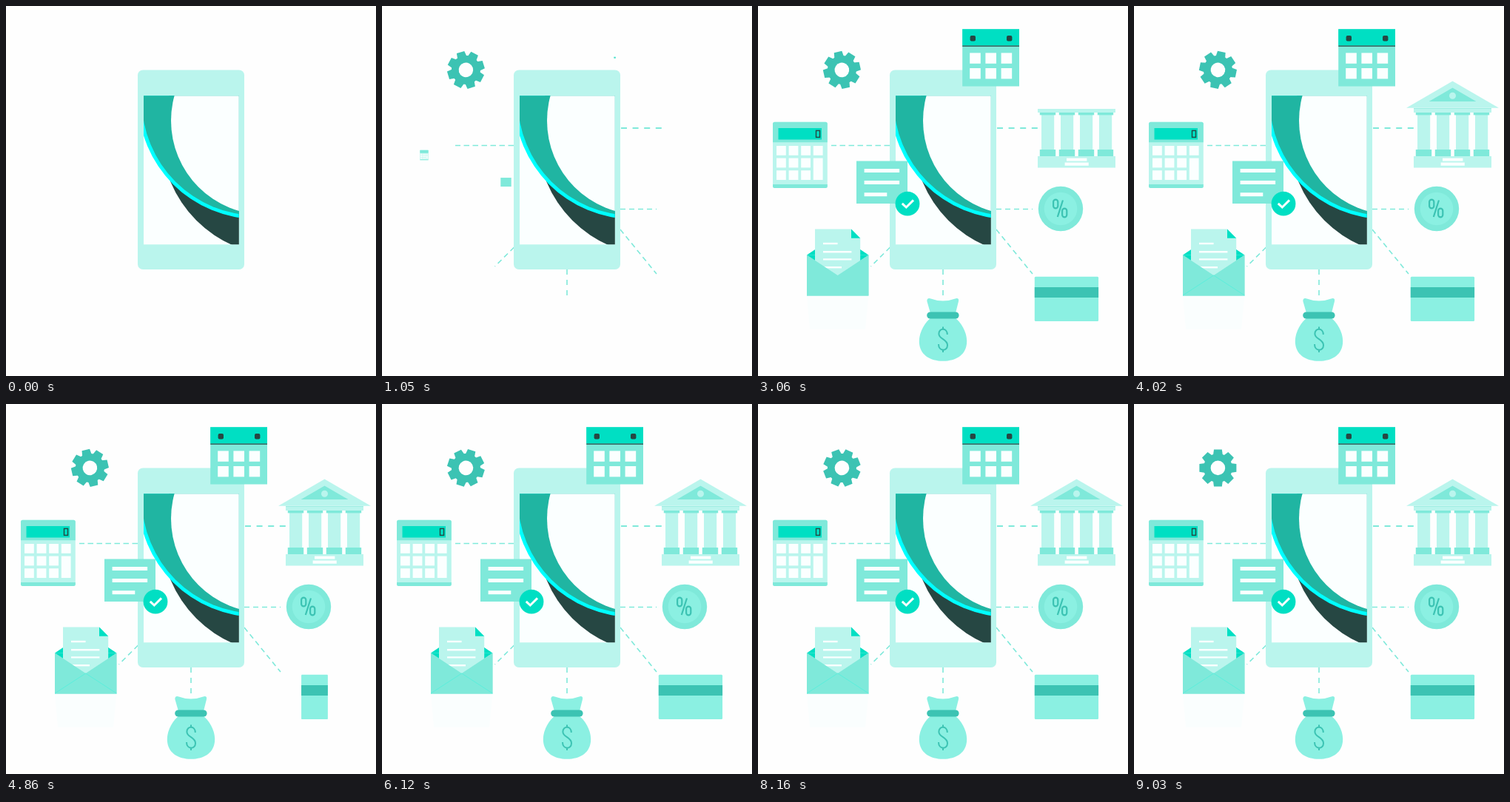
These frames come from a looping animation (500x500 px, 9.06 s). An HTML page with a canvas:

```html
<!DOCTYPE html>
<html lang="en">
<head>
<meta charset="utf-8">
<title>Mobile banking</title>
<style>
html, body { margin: 0; width: 100%; height: 100%; overflow: hidden; background: #fefefe; }
canvas { display: block; width: 500px; height: 500px; }
</style>
</head>
<body>
<canvas id="stage"></canvas>
<script>
const LOOP = 9060;
const PALE = '#baf5ed', MID = '#7fe9da', MINT = '#8bf0e2', ACCENT = '#00dfc3';
const TEAL = '#3cc3b3', DARK = '#264743', WHITE = '#fbffff', PAGE = '#fefefe';

const canvas = document.getElementById('stage');
const ctx = canvas.getContext('2d');
const dpr = window.devicePixelRatio || 1;
canvas.width = canvas.height = 500 * dpr;

let now = 0;

const linear = (from, dur) => Math.min(1, Math.max(0, (now - from) / dur));
const ease = (from, dur) => (1 - Math.cos(Math.PI * linear(from, dur))) / 2;
const mix = (a, b, p) => a + (b - a) * p;

function box(x, y, w, h, color, r = 0) {
  ctx.fillStyle = color;
  ctx.beginPath();
  if (r) ctx.roundRect(x, y, w, h, r); else ctx.rect(x, y, w, h);
  ctx.fill();
}

function disc(x, y, r, color) {
  ctx.fillStyle = color;
  ctx.beginPath();
  ctx.arc(x, y, r, 0, Math.PI * 2);
  ctx.fill();
}

function poly(color, ...pts) {
  ctx.fillStyle = color;
  ctx.beginPath();
  for (let i = 0; i < pts.length; i += 2) ctx.lineTo(pts[i], pts[i + 1]);
  ctx.closePath();
  ctx.fill();
}

function stroke(color, width, ...pts) {
  ctx.strokeStyle = color;
  ctx.lineWidth = width;
  ctx.beginPath();
  for (let i = 0; i < pts.length; i += 2) ctx.lineTo(pts[i], pts[i + 1]);
  ctx.stroke();
}

// Draws around (x, y) with its own scale; nothing at zero scale.
function scaled(x, y, sx, sy, draw) {
  if (sx < 0.002 || sy < 0.002) return;
  ctx.save();
  ctx.translate(x, y);
  ctx.scale(sx, sy);
  ctx.translate(-x, -y);
  draw();
  ctx.restore();
}

function dashes(x1, y1, x2, y2, dash, gap, width = 1.6) {
  const p = ease(90, 840);
  if (!p) return;
  ctx.setLineDash([dash, gap]);
  stroke(MID, width, x1, y1, mix(x1, x2, p), mix(y1, y2, p));
  ctx.setLineDash([]);
}

function connectors() {
  dashes(178, 188.5, 99, 188.5, 7.5, 4.5);
  dashes(323, 165, 378, 165, 8, 7.6, 1.8);
  dashes(322, 274.5, 371, 274.5, 7, 5);
  dashes(322, 302, 371, 362, 7, 5);
  dashes(178.5, 326, 152.5, 352, 7, 5);
  dashes(250, 356, 250, 392, 7, 7);
}

function phone() {
  box(178, 86.5, 144, 269.5, PALE, 7);
  ctx.save();
  ctx.beginPath();
  ctx.rect(186, 121.3, 128.8, 201);
  ctx.clip();
  box(186, 121, 129, 202, WHITE);
  disc(370.4, 176.7, 160, DARK);
  disc(339, 127.6, 160.2, '#00ffff');
  disc(339, 127.6, 155.4, '#20b5a2');
  disc(350, 155, 127, WHITE);
  ctx.restore();
}

function gear() {
  const s = ease(300, 600);
  if (!s) return;
  ctx.save();
  ctx.translate(113.4, 86.4);
  ctx.scale(s, s);
  ctx.rotate(Math.PI * (now - 1740) / 7290);
  disc(0, 0, 19.5, TEAL);
  for (let i = 0; i < 8; i++) {
    poly(TEAL, -6.5, -17, -5.4, -25, 5.4, -25, 6.5, -17);
    ctx.rotate(Math.PI / 4);
  }
  disc(0, 0, 9.8, PAGE);
  ctx.restore();
}

function calculator() {
  const s = ease(910, 550);
  scaled(57, 201.5, s, s, () => {
    box(20, 156.8, 73.8, 89, PALE, 2.5);
    box(20, 156.8, 73.8, 27.4, MID, [2.5, 2.5, 0, 0]);
    box(20, 241, 73.8, 5, MID, [0, 0, 2.5, 2.5]);
    for (let row = 0; row < 3; row++)
      for (let col = 0; col < 4; col++) {
        if (col === 3 && row === 2) continue;
        const tall = col === 3 && row === 1;
        box(25 + col * 16.6, 189 + row * 16.6, 12.8, tall ? 29.4 : 12.8, WHITE);
      }
    box(27.5, 165, 58.5 * ease(1450, 500), 15.4, ACCENT);
    if (now > 1960) {
      ctx.strokeStyle = DARK;
      ctx.lineWidth = 1.4;
      ctx.strokeRect(78.5, 168.4, 5, 9);
    }
  });
}

function calendar() {
  const s = ease(990, 550);
  scaled(314.6, 70, s, s, () => {
    box(276.2, 31.2, 76.8, 77.2, MID);
    box(276.2, 31.2, 76.8, 22.4, ACCENT);
    box(276.2, 53.5, 76.8, 1.2, DARK);
    box(286.6, 40, 7.4, 7.4, DARK, 2);
    box(336, 40, 7.4, 7.4, DARK, 2);
    for (let i = 0; i < 6; i++) {
      ctx.globalAlpha = linear(1600 + i * 110, 160);
      box(286.2 + (i % 3) * 21.2, 63.4 + (i > 2 ? 20.6 : 0), 14.6, 14.4, WHITE);
    }
    ctx.globalAlpha = 1;
  });
}

function note() {
  const s = ease(900, 500);
  scaled(167.5, 238, s, s, () => {
    box(133, 209.5, 69, 57.5, MID);
    [47.5, 47.5, 30.7].forEach((w, i) =>
      box(143.6, 220 + i * 16.1, w * ease(1200 + i * 200, 280), 5, WHITE));
  });
  const b = ease(1900, 350);
  scaled(202, 267.2, b, b, () => {
    disc(202, 267.2, 16.4, ACCENT);
    stroke(WHITE, 3, 194.8, 266.8, 200.3, 272, 210, 262.4);
  });
}

function bank() {
  scaled(430.5, 211, ease(1910, 350), 1, () => {
    box(378, 203, 105, 15.6, PALE);
    box(417, 205.6, 27.4, 4, WHITE);
    box(414.6, 211.6, 32.2, 4.2, WHITE);
  });
  for (let i = 0; i < 4; i++) {
    const x = 380.8 + i * 26;
    scaled(x, 203, 1, ease(2180 + i * 70, 380), () => {
      box(x + 2.2, 144, 17.2, 59, PALE);
      box(x, 144, 21.4, 3.4, MID);
      box(x, 194, 21.4, 9, MID);
    });
  }
  scaled(430.5, 141.5, ease(2560, 300), 1, () => box(378, 139, 105, 5, PALE));
  scaled(430.5, 138.3, 1, ease(3080, 420), () => {
    poly(PALE, 368, 137.8, 430.5, 101.6, 493, 137.8);
    poly(MID, 398.6, 129, 430.5, 110.6, 462.4, 129);
    disc(430.5, 121.2, 4.5, PALE);
    box(378, 138.2, 105, 0.8, MID);
  });
}

function coin() {
  const p = ease(1130, 1136);
  if (!p) return;
  ctx.save();
  ctx.translate(mix(300, 409, p), 274);
  ctx.rotate((p - 1) * 282 * Math.PI / 180);
  disc(0, 0, 30.2, MID);
  disc(0, 0, 22.3, MINT);
  ctx.strokeStyle = TEAL;
  ctx.lineWidth = 2.2;
  for (const side of [-1, 1]) {
    ctx.beginPath();
    ctx.roundRect(side * 6 - 3.1 - 0.8, side * 6 - 5.9 - 0.5, 6.2, 11.8, 3.1);
    ctx.stroke();
  }
  stroke(TEAL, 2.2, 3, -11.5, -4.2, 11);
  ctx.restore();
}

function card() {
  const s = ease(1050, 500);
  const flip = Math.abs(Math.cos(Math.PI * ease(4490, 900)));
  scaled(417, 396, s * flip, s, () => {
    box(373.8, 365.8, 86.3, 60.2, MINT, 1.5);
    box(373.8, 380, 86.3, 14, TEAL);
  });
}

function bag() {
  const p = ease(1130, 1136);
  if (!p) return;
  ctx.save();
  ctx.translate(0, -130 * (1 - p));
  ctx.fillStyle = MINT;
  ctx.beginPath();
  ctx.moveTo(233, 415);
  ctx.lineTo(228.4, 399);
  ctx.quadraticCurveTo(228, 394, 233.5, 395.4);
  ctx.quadraticCurveTo(250, 401.5, 266.5, 395.4);
  ctx.quadraticCurveTo(272, 394, 271, 399);
  ctx.lineTo(267, 415);
  ctx.fill();
  ctx.beginPath();
  ctx.moveTo(235, 420);
  ctx.bezierCurveTo(226, 427, 217.8, 440, 217.8, 453);
  ctx.bezierCurveTo(217.8, 471, 232, 479.8, 250, 479.8);
  ctx.bezierCurveTo(268, 479.8, 282.2, 471, 282.2, 453);
  ctx.bezierCurveTo(282.2, 440, 274, 427, 265, 420);
  ctx.fill();
  box(228.2, 413.4, 43.4, 9.2, TEAL, 4.6);
  ctx.strokeStyle = TEAL;
  ctx.lineWidth = 2;
  ctx.beginPath();
  ctx.moveTo(255.8, 444);
  ctx.bezierCurveTo(255.8, 434.6, 244.4, 434.6, 244.4, 443);
  ctx.bezierCurveTo(244.4, 450.5, 256, 450, 256, 458.4);
  ctx.bezierCurveTo(256, 467, 244, 467, 244, 457);
  ctx.stroke();
  stroke(TEAL, 2, 250, 433.6, 250, 437);
  stroke(TEAL, 2, 250, 464.4, 250, 468);
  ctx.restore();
}

function paper(rise) {
  ctx.save();
  ctx.beginPath();
  ctx.rect(60, 290, 96, 100);
  ctx.clip();
  ctx.translate(0, 38 * (1 - rise));
  poly(PALE, 77, 301.4, 126, 301.4, 138.2, 313.8, 138.2, 385, 77, 385);
  poly(ACCENT, 126, 301.4, 138.2, 313.8, 126, 313.8);
  box(88, 319.8, 19.6, 2.4, WHITE);
  box(88, 331, 38.4, 2.4, WHITE);
  box(88, 341.2, 38.4, 2.4, WHITE);
  box(88, 352, 25, 2.4, WHITE);
  ctx.restore();
}

function envelope() {
  const p = ease(1130, 1136), s = ease(1130, 847);
  if (!s) return;
  const open = 1 - 2 * ease(2250, 380);
  ctx.save();
  ctx.translate(mix(178, 107.7, p), mix(325, 363.6, p));
  ctx.scale(s, s);
  ctx.translate(-107.7, -363.6);
  poly('#fafefe', 66, 391, 149.4, 391, 145, 437, 70, 437);
  box(66, 336.4, 83.4, 55, MID);
  if (open < 1) {
    poly(ACCENT, 66, 336.4, 107.7, 364, 149.4, 336.4);
    if (open < 0) poly(ACCENT, 66, 336.4, 107.7, 336.4 + 28 * open, 149.4, 336.4);
    paper(ease(2520, 420));
    poly(MID, 66, 336.4, 107.7, 364, 149.4, 336.4, 149.4, 391.4, 66, 391.4);
  }
  if (open > 0) {
    const tip = 336.4 + 28 * open;
    poly(MID, 66, 336.4, 107.7, tip, 149.4, 336.4);
    stroke('#66dccd', 0.8, 90, mix(336.4, tip, 0.58), 107.7, tip, 125.4, mix(336.4, tip, 0.58));
  }
  ctx.globalAlpha = linear(3100, 500);
  stroke('#5cefdc', 1, 66, 391, 107.7, 364, 149.4, 391);
  ctx.globalAlpha = 1;
  ctx.restore();
}

function render(time) {
  now = time % LOOP;
  ctx.setTransform(dpr, 0, 0, dpr, 0, 0);
  box(0, 0, 500, 500, PAGE);
  connectors();
  coin();
  bag();
  envelope();
  phone();
  gear();
  calculator();
  calendar();
  note();
  bank();
  card();
}

const start = performance.now();
function tick() {
  render(performance.now() - start);
  requestAnimationFrame(tick);
}
tick();
</script>
</body>
</html>
```
